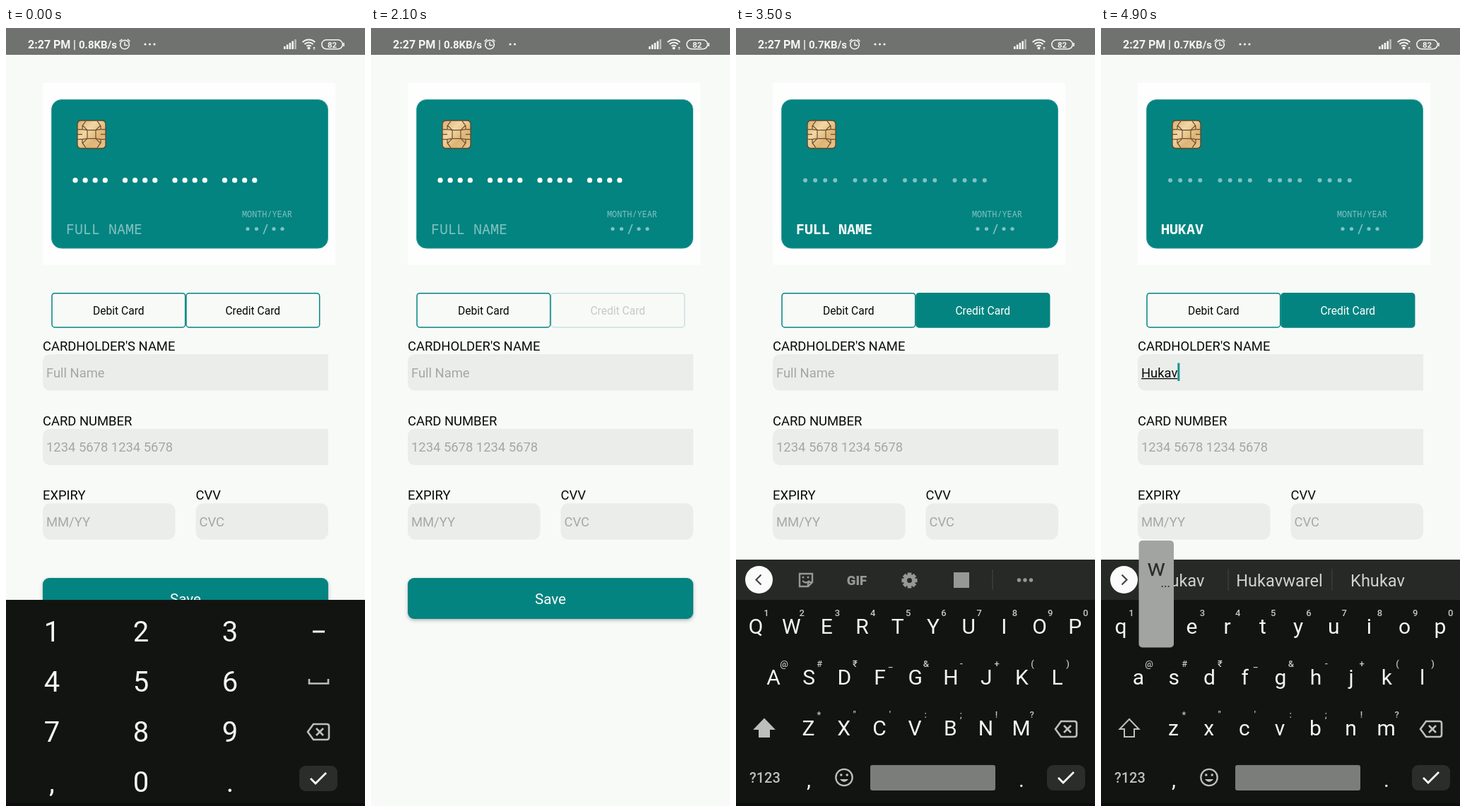
Recreate the animation shown at these times as an HTML page with a canvas. Size 508 by 1102 pixels, loop 5000 ms.

```html
<!DOCTYPE html>
<html lang="en">
<head>
<meta charset="utf-8">
<title>Card form</title>
<style>
html, body { margin: 0; width: 100%; height: 100%; overflow: hidden; background: #f8faf8; }
canvas { display: block; width: 508px; height: 1102px; }
</style>
</head>
<body>
<canvas id="stage" width="508" height="1102"></canvas>
<script>
const ctx = document.getElementById('stage').getContext('2d');
const W = 508, H = 1102, LOOP = 5000, STEP = 100;
const TEAL = '#038481', PAGE = '#f8faf8', INK = '#070907', KEYS = '#121411', SOFT = '#bdbfbc';
const SANS = 'Roboto, sans-serif', MONO = '"Noto Sans Mono", monospace';

// Letters and the times at which they are entered.
const TYPING = [['H', 4000], ['u', 4200], ['k', 4600], ['a', 4700], ['v', 4800], ['w', 5000]];
const SUGGESTIONS = {
  H: ['H', 'Ha', 'He'],
  Hu: ['Hu', 'Gu', 'Tu'],
  Huk: ['Huk', 'Hul', 'Hum'],
  Huka: ['Huka', 'Hula', 'Huma'],
  Hukav: ['Hukav', 'Hukavwarel', 'Khukav']
};
const ROWS = [
  { keys: 'qwertyuiop', hints: '1234567890', x: 28 },
  { keys: 'asdfghjkl', hints: '@#₹_&-+()', x: 53 },
  { keys: 'zxcvbnm', hints: '*"\':;!?', x: 102.5 }
];
const KEY_STEP = 50.2, ROW_STEP = 72;

const clamp = v => Math.max(0, Math.min(1, v));
const ease = v => v * v * (3 - 2 * v);

function text(str, x, y, size, color, { align = 'left', weight = 400, family = SANS } = {}) {
  ctx.font = `${weight} ${size}px ${family}`;
  ctx.textAlign = align;
  ctx.fillStyle = color;
  ctx.fillText(str, x, y);
}

function rect(x, y, w, h, color) {
  ctx.fillStyle = color;
  ctx.fillRect(x, y, w, h);
}

function round(x, y, w, h, r, fill, stroke, width = 1.5) {
  ctx.beginPath();
  ctx.roundRect(x, y, w, h, r);
  paint(fill, stroke, width);
}

function dot(x, y, r, fill, stroke, width) {
  ctx.beginPath();
  ctx.arc(x, y, r, 0, 7);
  paint(fill, stroke, width);
}

function paint(fill, stroke, width) {
  if (fill) { ctx.fillStyle = fill; ctx.fill(); }
  if (stroke) { ctx.strokeStyle = stroke; ctx.lineWidth = width; ctx.stroke(); }
}

function path(d, x, y, fill, stroke, width = 2) {
  ctx.save();
  ctx.translate(x, y);
  const shape = new Path2D(d);
  if (fill) { ctx.fillStyle = fill; ctx.fill(shape); }
  if (stroke) { ctx.strokeStyle = stroke; ctx.lineWidth = width; ctx.stroke(shape); }
  ctx.restore();
}

function statusBar(t) {
  const white = '#f4f5f4';
  rect(0, 0, W, 38, '#70726f');
  text('2:27 PM', 31, 29, 16, white, { weight: 700 });
  rect(96.3, 17, 1.4, 14, white);
  text(t < 3400 ? '0.8KB/s' : '0.7KB/s', 103, 29, 15, white, { weight: 700 });

  dot(168, 23.5, 6.3, null, white, 1.6);
  path('M0-4V1H4 M-7.5-4.5L-3.8-7.8 M7.5-4.5L3.8-7.8', 168, 23.5, null, white, 1.5);
  const count = t >= 1300 && t < 3400 ? 2 : 3;
  for (let i = 0; i < count; i++) dot(197 + i * 6.5, 23, 1.6, white);

  for (let i = 0; i < 5; i++) {
    const h = 4 + i * 2.5;
    rect(393 + i * 3.8, 30 - h, 2.6, h, i < 4 ? white : '#b9bab9');
  }
  for (const r of [4.5, 8.5, 12.5]) {
    ctx.beginPath();
    ctx.arc(428.5, 29, r, -Math.PI * .75, -Math.PI * .25);
    paint(null, white, 2);
  }
  dot(428.5, 28.5, 2, white);
  path('M0 0V-4M-1.5-2.5L0-4L1.5-2.5', 436, 31, null, white, 1);
  round(446.8, 16.8, 29.5, 13, 6.5, null, white, 1.5);
  rect(477.2, 21, 1.6, 5, white);
  text('82', 461.5, 27.5, 11.5, white, { align: 'center', weight: 700 });
}

function chip() {
  const gold = ctx.createLinearGradient(101, 131, 141, 171);
  gold.addColorStop(0, '#d9ad6e');
  gold.addColorStop(.35, '#f1d7a5');
  gold.addColorStop(.65, '#dfb476');
  gold.addColorStop(1, '#e9c48d');
  round(101, 131, 40, 39.5, 5, gold, '#5b4426', 1.3);
  path('M-6-6H6V6H-6Z M-20-7H-13L-6-6 M-20 7H-13L-6 6 M20-7H13L6-6 M20 7H13L6 6' +
    'M-13-7V-12L-8-19 M13-7V-12L8-19 M-13 7V12L-8 19 M13 7V12L8 19' +
    'M-6-6L-13-13 M6-6L13-13 M-6 6L-13 13 M6 6L13 13 M-20 0H-13 M13 0H20',
    121, 150.7, null, '#69502e', 1.2);
}

function card(t, typed) {
  const dim = 'rgba(255,255,255,.5)', nameFocused = t >= 2800;
  rect(52, 78, 414, 257.5, '#fefefe');
  round(64.5, 101.5, 391, 210.5, 14, TEAL, '#3a9d9b', 1);
  chip();
  for (let i = 0; i < 19; i++) {
    if (i % 5 < 4) dot(98 + i * 14.1, 215.7, nameFocused ? 3 : 3.6, nameFocused ? dim : '#fff');
  }
  text(typed ? typed.toUpperCase() : 'FULL NAME', 85, 291.5, 20, nameFocused ? '#fff' : dim,
    { family: MONO, weight: nameFocused ? 700 : 400 });
  text('MONTH/YEAR', 334, 268, 11.8, dim, { family: MONO });
  for (const x of [342, 354.5, 379, 391]) dot(x, 284.5, 2.6, dim);
  text('/', 367, 291.5, 20, dim, { align: 'center', family: MONO });
}

function creditTab(t) {
  const filled = t >= 2250;
  ctx.save();
  if (t >= 2100) ctx.globalAlpha = .2 + .8 * ease(clamp((t - 2250) / 300));
  tab('Credit Card', 255, filled);
  ctx.restore();
}

function tab(label, x, filled) {
  round(x, 375.7, 188.7, 48.3, 4, filled ? TEAL : null, TEAL, 1.5);
  text(label, x + 94.3, 405.5, 15.6, filled ? '#fff' : INK, { align: 'center' });
}

function field(label, hint, x, y, w, radii, value = '') {
  text(label, x, y - 5, 18.4, INK);
  round(x, y, w, 51.5, radii, '#ebedeb');
  text(value || hint, x + 5, y + 32.5, 18.4, value ? INK : '#a5a7a5');
  const end = value ? ctx.measureText(value).width : 0;
  if (value) rect(x + 5, y + 34, end, 1.3, INK);
  return x + 5 + end;
}

function form(t, typed) {
  tab('Debit Card', 65, false);
  creditTab(t);
  const caret = field("CARDHOLDER'S NAME", 'Full Name', 52, 462, 404, [10, 0, 0, 10], typed);
  field('CARD NUMBER', '1234 5678 1234 5678', 52, 567.7, 404, [10, 0, 0, 10]);
  field('EXPIRY', 'MM/YY', 52, 673.2, 187.5, 11);
  field('CVV', 'CVC', 268.5, 673.2, 187.5, 11);
  if (t >= 400 && t < 900) rect(57, 580, 3, 26, '#16918f');
  if (t >= 2900 && t < 3400 || t >= 3900) rect(caret, 474.5, 3, 25.5, '#16918f');

  // The page is cut short as soon as the letter keyboard starts to rise.
  if (t < 2900) {
    ctx.save();
    ctx.shadowColor = 'rgba(0,0,0,.28)';
    ctx.shadowBlur = 5;
    ctx.shadowOffsetY = 2;
    round(52, 779, 404, 58, 9, TEAL);
    ctx.restore();
    text('Save', 254, 816, 20.5, '#fff', { align: 'center' });
  }
}

function backspace(x, y) {
  path('M-15 0L-7-11H12Q15-11 15-8V8Q15 11 12 11H-7Z M-3-5L7 5M7-5L-3 5', x, y, null, SOFT, 2.6);
}

function enterKey(x, y) {
  round(x - 27, y - 18, 54, 36, 9, '#2b2d2a');
  path('M-11 0L-4 7L11-8', x, y, null, '#fff', 2.8);
}

function numberPad() {
  const white = '#f6f8f5';
  rect(0, 810, W, 292, KEYS);
  ['123', '456', '789', ',0.'].forEach((row, r) => {
    [...row].forEach((c, i) => text(c, 65 + i * 126, 869 + r * 71, 40, white, { align: 'center' }));
  });
  rect(434, 853.5, 17, 3, white);
  path('M-13.5-4V2.5H13.5V-4', 442.5, 926, null, SOFT, 2.6);
  backspace(442, 997);
  enterKey(442, 1063);
}

function toolbarIcons() {
  const grey = '#969895';
  path('M-9-9H9V3L3 9H-9Z M9 3H3V9', 99, 782, null, grey, 2.4);
  dot(95, 778, 1.5, grey);
  dot(102, 778, 1.5, grey);
  path('M-5 1Q0 6 5 1', 99, 782, null, grey, 2.2);
  text('GIF', 171, 788.5, 18.5, grey, { align: 'center', weight: 900 });
  for (let i = 0; i < 8; i++) {
    ctx.save();
    ctx.translate(245.5, 782.5);
    ctx.rotate(i * Math.PI / 4);
    rect(-2.8, -11, 5.6, 5, grey);
    ctx.restore();
  }
  dot(245.5, 782.5, 6, null, grey, 5);
  rect(308, 771, 22, 22, grey);
  rect(362.5, 767, 1, 29, '#474947');
  for (let i = -1; i < 2; i++) dot(409 + i * 8.5, 782, 2.7, grey);
}

function toolbar(typed) {
  rect(0, 753, W, 57, '#272927');
  dot(32.5, 781.5, 19.5, '#fafbfa');
  path(typed ? 'M-3-7L4 0L-3 7' : 'M3-7L-4 0L3 7', 32.5, 781.5, null, '#444644', 2.2);
  if (!typed) return toolbarIcons();
  rect(179.5, 766, 1, 31, '#454745');
  rect(326.5, 766, 1, 31, '#454745');
  SUGGESTIONS[typed].forEach((word, i) =>
    text(word, 113.5 + i * 139, 790.5, 23.6, '#d0d2cf', { align: 'center' }));
}

function letterKeyboard(typed) {
  const white = '#f4f6f3';
  rect(0, 753, W, 349, KEYS);
  toolbar(typed);
  ROWS.forEach((row, r) => [...row.keys].forEach((key, i) => {
    const x = row.x + i * KEY_STEP, y = 858 + r * ROW_STEP;
    text(typed ? key : key.toUpperCase(), x, y, 30, white, { align: 'center' });
    text(row.hints[i], x + 15, y - 25.5, 13, '#c5c7c4', { align: 'center', weight: 500 });
  }));
  path('M0-13L13.5 1H7V12H-7V1H-13.5Z', 40, 992, typed ? null : SOFT, SOFT, 2);
  backspace(467, 993);
  text('?123', 19, 1069, 20, SOFT, { weight: 500 });
  text(',', 103, 1075, 30, white, { align: 'center' });
  dot(153, 1061.5, 11.7, null, SOFT, 2.3);
  dot(148.8, 1058, 1.8, SOFT);
  dot(157.2, 1058, 1.8, SOFT);
  path('M-6 2.5Q0 10 6 2.5Z', 153, 1061.5, SOFT);
  round(190, 1044, 177, 36, 3, '#7b7d7b');
  text('.', 404, 1075, 30, white, { align: 'center' });
  enterKey(467, 1062);
}

function keyPopup(t) {
  const press = TYPING.findLast(([, at]) => t >= at - 100 && t < at + 100);
  if (!press) return;
  const letter = press[0];
  const r = ROWS.findIndex(row => row.keys.includes(letter.toLowerCase()));
  const x = ROWS[r].x + ROWS[r].keys.indexOf(letter.toLowerCase()) * KEY_STEP;
  const y = 726 + r * ROW_STEP;
  round(x - 24.7, y, 49.5, 151.5, 5, '#a2a4a1');
  text(letter, x, y + 50, 34, '#2c2e2c', { align: 'center' });
  for (let i = 0; i < 3; i++) dot(x + 8.5 + i * 4.5, y + 65, 1.1, '#2c2e2c');
}

function slide(offset, draw) {
  ctx.save();
  ctx.translate(0, offset);
  draw();
  ctx.restore();
  rect(0, 1098, W, 4, '#0c0e0b');
}

function typedAt(t) {
  return TYPING.filter(([, at]) => at <= t).map(([c]) => c).join('');
}

function render(t) {
  const typed = typedAt(t);
  rect(0, 0, W, H, PAGE);
  card(t, typedAt(t - 100));
  form(t, typed);
  statusBar(t);
  if (t < 1600) slide(292 * clamp((t - 1300) / 300) ** 2, numberPad);
  if (t >= 2900) slide(349 * (1 - clamp((t - 2875) / 325)) ** 2, () => letterKeyboard(typed));
  keyPopup(t);
}

const start = performance.now();
function tick() {
  const t = (performance.now() - start) % LOOP;
  render(Math.floor(t / STEP) * STEP);
  requestAnimationFrame(tick);
}
tick();
</script>
</body>
</html>
```
